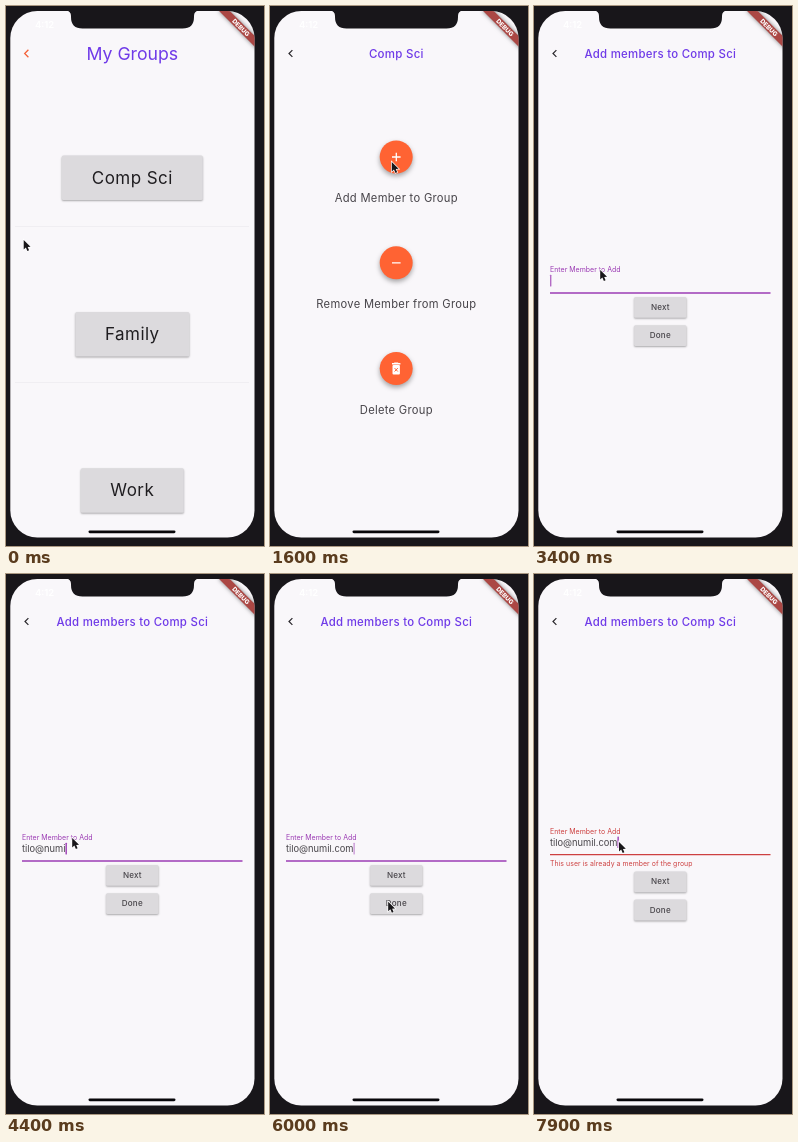
Animation, 258 px wide and 540 px high, one loop 8000 ms. Source, as an HTML page with a canvas:

```html
<!DOCTYPE html>
<html lang="en">
<head>
<meta charset="utf-8">
<title>Group manager demo</title>
<style>
  html, body { margin: 0; width: 100%; height: 100%; overflow: hidden; background: #18161a; }
  canvas { display: block; width: 258px; height: 540px; }
</style>
</head>
<body>
<canvas id="stage"></canvas>
<script>
const LOOP = 8000;
const WIDTH = 258, HEIGHT = 540, CENTER = 126;
const INK = '#1f1d20', SOFT_INK = '#474449', PAPER = '#f9f7fa', BEZEL = '#18161a';
const VIOLET = '#6f3ae8', ORANGE = '#ff6333';
const GRAY = [118, 115, 121], LINE_GRAY = [165, 162, 167], PURPLE = [156, 60, 180], RED = [205, 64, 64];
const EMAIL = 'tilo@numil.com';

// Moments of the story, in ms
const GROUP_OPENS = 1000, FORM_OPENS = 2100, FOCUS = 2850, FIRST_KEY = 3600;
const DONE_PRESS = 6400, ERROR = 6550, BLINK_START = 5400;

// Pointer path: time, x, y
const POINTER = [
  [0, 17.7, 234], [500, 138.5, 169.5], [1050, 138.5, 169.5], [1500, 121.8, 156],
  [2100, 121.8, 156], [2600, 66.2, 264], [5400, 66.2, 264], [6200, 127.7, 339.4],
  [6700, 127.7, 339.4], [7200, 90, 277], [7700, 85, 268], [LOOP, 85, 268]
];

const canvas = document.getElementById('stage');
const ctx = canvas.getContext('2d');
const ratio = window.devicePixelRatio || 1;
canvas.width = WIDTH * ratio;
canvas.height = HEIGHT * ratio;

const clamp = v => Math.max(0, Math.min(1, v));
const ramp = (t, start, length) => clamp((t - start) / length);
const smooth = v => v * v * (3 - 2 * v);
const lerp = (a, b, v) => a + (b - a) * v;
const mix = (a, b, v) => `rgb(${a.map((c, i) => Math.round(lerp(c, b[i], v)))})`;

// Press highlight: quick rise, short hold, fade
const press = (t, start, hold = 250) =>
  ramp(t, start, 100) * (1 - ramp(t, start + hold, 200));

function text(str, x, y, size, color, { weight = 400, spacing = 0, align = 'center' } = {}) {
  ctx.font = `${weight} ${size}px Inter, sans-serif`;
  ctx.letterSpacing = spacing + 'px';
  ctx.textAlign = align;
  ctx.fillStyle = color;
  ctx.fillText(str, x, y);
}

function line(points, color, width) {
  ctx.beginPath();
  points.forEach(([x, y]) => ctx.lineTo(x, y));
  ctx.strokeStyle = color;
  ctx.lineWidth = width;
  ctx.stroke();
}

function shadow(blur, y, alpha) {
  ctx.shadowColor = `rgba(0,0,0,${alpha})`;
  ctx.shadowBlur = blur * ratio;
  ctx.shadowOffsetY = y * ratio;
}

function box(x, y, w, h, r, color) {
  ctx.beginPath();
  ctx.roundRect(x, y, w, h, r);
  ctx.fillStyle = color;
  ctx.fill();
}

function button(label, y, w, h, size, color, style, pressed = 0) {
  ctx.save();
  shadow(2 + 3 * pressed, 1 + pressed, 0.32);
  box(CENTER + 0.3 - w / 2, y, w, h, 1.5, mix([220, 218, 221], [187, 185, 188], pressed));
  ctx.restore();
  text(label, CENTER + 0.3, y + h / 2 + size * 0.36 - 0.3, size, color, style);
}

function header(title, size, y, arrow, style) {
  const { reach, width, color } = arrow;
  line([[22.4, 47.5 - reach], [22.4 - reach, 47.5], [22.4, 47.5 + reach]], color, width);
  text(title, CENTER + 0.3, y, size, VIOLET, style);
}

const BACK_ARROW = { reach: 3.4, width: 1.2, color: '#2b292d' };
const HOME_ARROW = { reach: 3.7, width: 1.3, color: '#f4633a' };

function groupsPage(t) {
  header('My Groups', 17.7, 54, HOME_ARROW);
  [220.5, 376.5].forEach(y => line([[9, y], [243, y]], '#f0eef2', 1));
  const style = { spacing: 0.45 };
  button('Comp Sci', 149.5, 141, 44.5, 17, INK, style, press(t, 700));
  button('Family', 306, 114, 44.5, 17, INK, style);
  button('Work', 462.3, 103, 44.5, 17, INK, style);
}

function minusIcon(y) {
  line([[CENTER - 4, y], [CENTER + 4.6, y]], '#fff', 1.3);
}

function plusIcon(y) {
  minusIcon(y);
  line([[CENTER + 0.3, y - 4.3], [CENTER + 0.3, y + 4.3]], '#fff', 1.3);
}

function trashIcon(y) {
  const x = CENTER + 0.2;
  box(x - 4.2, y - 5.5, 8.4, 1.4, 0, '#fff');
  box(x - 2, y - 6.2, 4, 1, 0, '#fff');
  box(x - 3.7, y - 3.5, 7.4, 9.3, 1, '#fff');
  line([[x - 1.6, y - 0.5], [x + 1.6, y + 2.9]], ORANGE, 1);
  line([[x + 1.6, y - 0.5], [x - 1.6, y + 2.9]], ORANGE, 1);
}

function actionsPage(t) {
  header('Comp Sci', 11.5, 51.7, BACK_ARROW, { weight: 500, spacing: 0.25 });
  const actions = [
    ['Add Member to Group', plusIcon], ['Remove Member from Group', minusIcon], ['Delete Group', trashIcon]
  ];
  actions.forEach(([label, icon], i) => {
    const y = 151 + i * 105.8;
    const pressed = i ? 0 : press(t, 1900);
    ctx.save();
    shadow(5 + 3 * pressed, 2.5, 0.35);
    box(CENTER - 16.3, y - 16.5, 33, 33, 16.5, mix([255, 99, 51], [255, 145, 110], pressed));
    ctx.restore();
    icon(y);
    text(label, CENTER + 0.3, y + 45, 11.2, SOFT_INK, { spacing: 0.29 });
  });
}

function typedCount(t) {
  if (t < FIRST_KEY) return 0;
  const fast = Math.floor((t - FIRST_KEY) / 100) + 1;
  return fast <= 10 ? fast : Math.min(EMAIL.length, 10 + Math.floor((t - 4500) / 190));
}

function caretAlpha(t) {
  if (t < FOCUS) return 0;
  if (t >= FIRST_KEY && t < BLINK_START) return 1;
  const since = t - (t < FIRST_KEY ? FOCUS : BLINK_START);
  const fade = ramp(since % 500, 0, 200);
  const half = Math.floor(since / 500);
  return half === 0 ? 1 : half % 2 ? 1 - fade : fade;
}

function formPage(t) {
  const left = { align: 'left' };
  const focus = smooth(ramp(t, FOCUS, 200));
  const error = ramp(t, ERROR, 170);
  const alert = smooth(ramp(t, ERROR + 60, 200));
  const shift = t >= ERROR ? 6.4 : 0;
  const tone = idle => alert ? mix(PURPLE, RED, alert) : mix(idle, PURPLE, focus);

  header('Add members to Comp Sci', 11.4, 51.7, BACK_ARROW, { weight: 500, spacing: 0.28 });
  text('Enter Member to Add', 16, lerp(273.2, 266.2, focus) - shift, lerp(9.35, 7, focus), tone(GRAY), left);

  const typed = EMAIL.slice(0, typedCount(t));
  text(typed, 16, 278 - shift, 9.3, SOFT_INK, left);
  const caretX = 16 + ctx.measureText(typed).width;
  ctx.globalAlpha = caretAlpha(t);
  box(caretX, 268.8 - shift, 1.4, 11.6, 0.5, mix(PURPLE, PURPLE, 0));
  ctx.globalAlpha = 1;

  const lineY = 287 - shift;
  line([[16, lineY], [236.5, lineY]], tone(LINE_GRAY), lerp(1.1, 1.3, focus));
  if (error) {
    ctx.globalAlpha = error;
    text('This user is already a member of the group', 16, lerp(290, 292, error), 6.9,
      mix([240, 150, 110], RED, alert), { align: 'left', spacing: 0.06 });
    ctx.globalAlpha = 1;
  }

  const style = { weight: 500, spacing: 0.16 };
  button('Next', 291 + shift, 52.5, 20.8, 8.1, SOFT_INK, style);
  button('Done', 319.2 + shift, 52.5, 20.8, 8.1, SOFT_INK, style, press(t, DONE_PRESS));
}

function debugRibbon() {
  ctx.save();
  ctx.translate(250, 6);
  ctx.rotate(Math.PI / 4);
  ctx.save();
  shadow(4, 0, 0.5);
  box(-27, 17.8, 54, 7.6, 0, '#ab4744');
  ctx.restore();
  text('DEBUG', 0.4, 23.9, 6.3, '#fff', { weight: 800 });
  ctx.restore();
}

function pointer(t) {
  const next = POINTER.findIndex(p => p[0] > t);
  const [t0, x0, y0] = POINTER[next - 1], [t1, x1, y1] = POINTER[next];
  const start = t0 === 0 ? 50 : t0;
  const v = smooth(ramp(t, start, t1 - start));
  ctx.save();
  ctx.translate(lerp(x0, x1, v), lerp(y0, y1, v));
  ctx.scale(0.9, 0.9);
  ctx.beginPath();
  [[0, 0], [0, 10.6], [2.4, 8.4], [4.1, 12.2], [6, 11.4], [4.4, 7.7], [7.6, 7.6]]
    .forEach(([x, y]) => ctx.lineTo(x, y));
  ctx.closePath();
  ctx.strokeStyle = '#fff';
  ctx.lineWidth = 1.5;
  ctx.stroke();
  ctx.fillStyle = '#19171a';
  ctx.fill();
  ctx.restore();
}

function draw(t) {
  ctx.setTransform(ratio, 0, 0, ratio, 0, 0);
  box(0, 0, WIDTH, HEIGHT, 0, BEZEL);

  ctx.save();
  box(4.3, 5, 244.2, 526.5, 27, PAPER);
  ctx.clip();
  text('4:12', 29, 22, 9.5, '#fff', { weight: 600, align: 'left' });
  (t < GROUP_OPENS ? groupsPage : t < FORM_OPENS ? actionsPage : formPage)(t);
  debugRibbon();
  ctx.restore();

  ctx.fillStyle = BEZEL;
  ctx.fill(new Path2D('M60 4.5Q65 5 65 10V11Q65 22.5 76.5 22.5H176.5Q188 22.5 188 11V10Q188 5 193 4.5Z'));
  box(82.5, 524.4, 87, 2.8, 1.4, '#08070a');
  pointer(t);
}

function tick() {
  draw(performance.now() % LOOP);
  requestAnimationFrame(tick);
}
tick();
</script>
</body>
</html>
```
